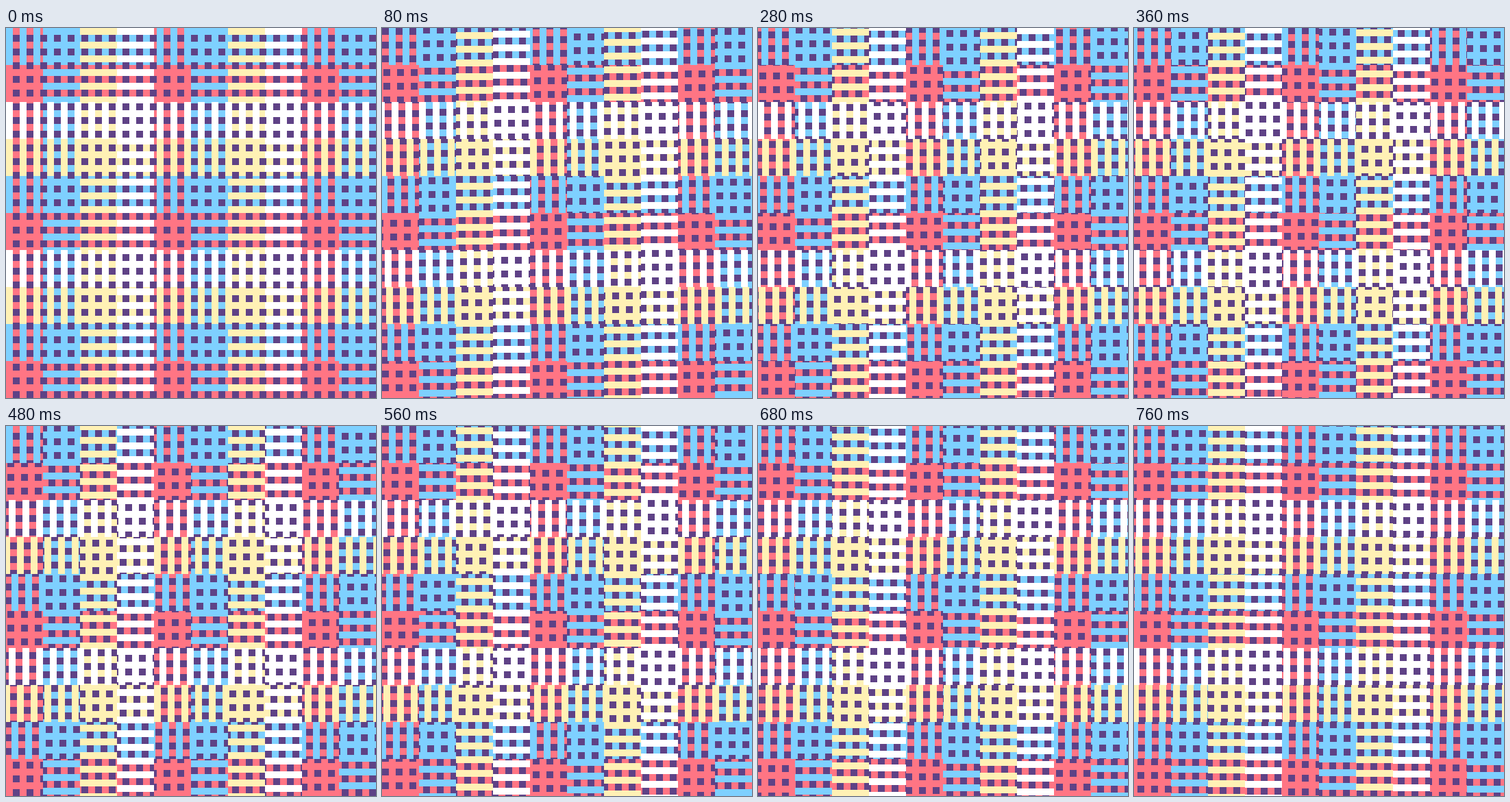
An HTML page for the animation above (800 ms loop, 540x540 px).

```html
<!DOCTYPE html>
<html lang="en">
<head>
<meta charset="utf-8">
<title>Sliding weave</title>
<style>
  html, body {
    margin: 0;
    width: 100%;
    height: 100%;
    overflow: hidden;
    background: #5f4286;
  }
  #weave {
    position: relative;
    width: 540px;
    height: 540px;
    overflow: hidden;
  }
  .band {
    position: absolute;
    background: linear-gradient(var(--dir), var(--ink) 50%, transparent 0) 0 0 / 20px 20px;
    animation: slide 800ms steps(20) infinite;
  }
  .row { left: 0; width: 540px; height: 54px; --dir: 90deg; --y: 0px; }
  .col { top: 0; width: 54px; height: 540px; --dir: 180deg; --x: 0px; }
  @keyframes slide {
    from { background-position: 0 0; }
    to { background-position: var(--x) var(--y); }
  }
</style>
</head>
<body>
<div id="weave"></div>
<script>
  // Inks from lowest to highest: a lighter stripe always lies on top.
  const inks = ['#ff7584', '#7ed0ff', '#fff1b5', '#ffffff'];
  const rowInks = [1, 0, 3, 2];
  const colInks = [0, 1, 2, 3];
  const weave = document.getElementById('weave');

  function addBand(type, edge, axis, i, rank, turns) {
    const band = document.createElement('div');
    band.className = 'band ' + type;
    band.style[edge] = i * 54 + 'px';
    band.style.zIndex = rank;
    band.style.setProperty('--ink', inks[rank]);
    band.style.setProperty(axis, turns * 20 + 'px');
    weave.append(band);
  }

  for (let i = 0; i < 10; i++) {
    // Stripe periods travelled per loop: -5..-1, then 1..5.
    const turns = i < 5 ? i - 5 : i - 4;
    addBand('row', 'top', '--x', i, rowInks[i % 4], turns);
    addBand('col', 'left', '--y', i, colInks[i % 4], -turns);
  }
</script>
</body>
</html>
```
